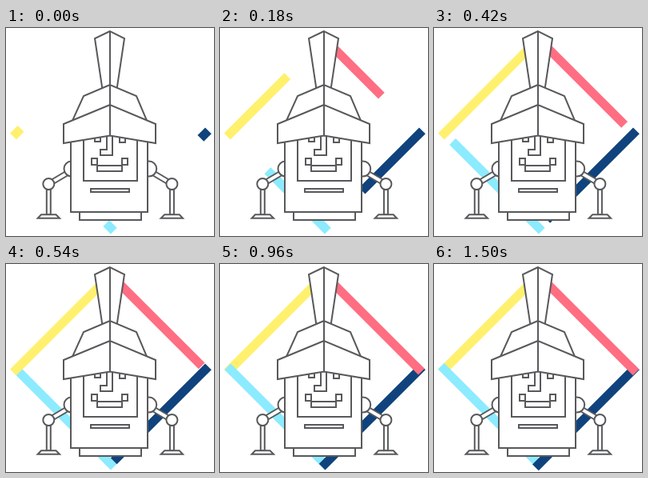
An HTML page that plays this animation: 260x260 px, repeating every 1530 ms.

```html
<!DOCTYPE html>
<html lang="en">
<head>
<meta charset="utf-8">
<title>Robot in a diamond</title>
<style>
  html, body { margin: 0; width: 100%; height: 100%; overflow: hidden; background: #fff; }
  svg { display: block; width: 100vw; height: 100vh; }
</style>
</head>
<body>
<svg viewBox="0 0 260 260">
  <g id="bands" fill="none" stroke-width="11"></g>
  <g fill="#fff" stroke="#58595b" stroke-width="2">
    <defs>
      <g id="arm">
        <path d="M57 189.5L79 176.5L82 181.5L60 194.5Z"/>
        <circle cx="82" cy="176" r="9.5"/>
        <circle cx="53.3" cy="195" r="7"/>
        <path d="M50.8 202H55.8V233.5H50.8Z"/>
        <path d="M44 233.3H62.5L67 237.7H39.7Z"/>
      </g>
    </defs>
    <use href="#arm"/>
    <use href="#arm" transform="translate(260.7 0) scale(-1 1)"/>
    <path d="M92 230H169V240H92Z"/>
    <path d="M81 120H177V230H81Z"/>
    <path d="M97 125H164V191H97Z"/>
    <path d="M111 135H118V142H111ZM142 135H149V143H142Z"/>
    <path d="M126 130V152H118V159H133V130"/>
    <path d="M107 163H114V171H107ZM145 163H152V171H145ZM114 172H145V179H114Z"/>
    <path d="M106 201H154V205H106Z"/>
    <path d="M130 4L111 13L121 80H138L148 13ZM130 4V80"/>
    <path d="M130 71L97 85L82 118H177L163 85ZM130 71V100"/>
    <path d="M130 96L72 120V144L130 134.5L187 144V120ZM130 96V134.5"/>
  </g>
</svg>
<script>
const LOOP = 1530, STEP = 30, LEAD = 22, REACH = 126;

// start point, direction, colour; later bands lie on top
const bands = [
  [9, 135.5, 1, -1, '#fff06e'],
  [134.8, 253.6, -1, -1, '#8cebff'],
  [252.9, 128.3, -1, 1, '#10437d'],
  [126.5, 9.3, 1, 1, '#ff6e82']
].map(([x, y, dx, dy, color]) => {
  const el = document.createElementNS('http://www.w3.org/2000/svg', 'path');
  el.setAttribute('stroke', color);
  document.getElementById('bands').append(el);
  return { x, y, dx, dy, el };
});

// cubic-bezier(.19, 1, .22, 1), solved by bisection
function ease(x) {
  let lo = 0, hi = 1;
  for (let i = 0; i < 24; i++) {
    const s = (lo + hi) / 2, r = 1 - s;
    if (0.57 * r * r * s + 0.66 * r * s * s + s ** 3 < x) lo = s;
    else hi = s;
  }
  return 1 - (1 - lo) ** 3;
}

function draw(ms) {
  const t = Math.floor((ms % LOOP) / STEP) * STEP;
  const d = REACH * ease((t + LEAD) / (LOOP - STEP + LEAD));
  for (const { x, y, dx, dy, el } of bands) {
    el.setAttribute('d', `M${x} ${y}l${dx * d} ${dy * d}`);
  }
}

const start = performance.now();
function tick() {
  draw(performance.now() - start);
  requestAnimationFrame(tick);
}
tick();
</script>
</body>
</html>
```
